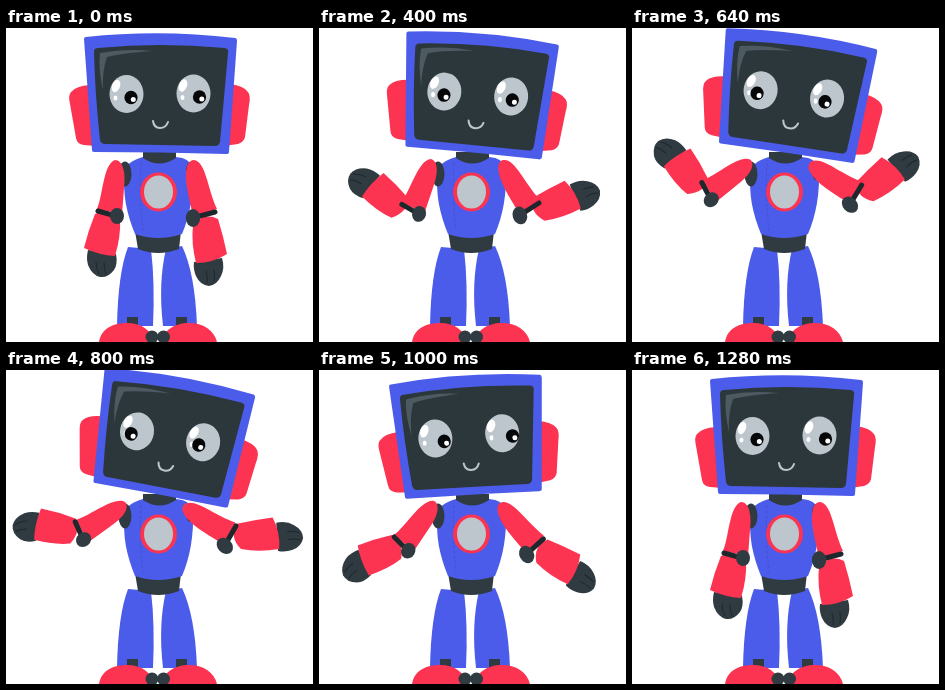
These frames come from a looping animation (307x314 px, 1400 ms). An HTML page with a canvas:

```html
<!DOCTYPE html>
<html lang="en">
<head>
<meta charset="utf-8">
<title>Waving robot</title>
<style>
  html, body { margin: 0; width: 100%; height: 100%; overflow: hidden; background: #fff; }
  canvas { display: block; width: 307px; height: 314px; }
</style>
</head>
<body>
<canvas id="stage"></canvas>
<script>
const W = 307, H = 314, LOOP = 1400, STEP = 40, LAST = 1280;
const BLUE = '#4c5cea', RED = '#fc3351', DARK = '#2f3b41', SCREEN = '#2c373b',
      GRAY = '#bcc6cc', SHINE = '#4d5a61', LINE = '#1d272c';

const canvas = document.getElementById('stage');
const ctx = canvas.getContext('2d');
const ratio = window.devicePixelRatio || 1;
canvas.width = Math.round(W * ratio);
canvas.height = Math.round(H * ratio);

// Poses in degrees over time; arm angles open outwards on both sides.
const TIMES = [0, 200, 400, 540, 640, 800, 1000, 1110, LAST];
const POSE = {
  head:       [0, 3, 4.6, 6.3, 7.6, 9.8, -4.1, -6.5, 0],
  leftUpper:  [0, -6.5, 14.2, 34, 46.6, 50, 29.5, 18, 0],
  leftFore:   [0, 43, 118, 139, 132, 88, 55, 33, 0],
  rightUpper: [0, -9, 18, 35, 44, 45.5, 27.5, 16.5, 0],
  rightFore:  [0, 32, 104, 126, 120, 85.5, 51, 31, 0]
};

// Cubic curve through the poses that rests at each turning point.
function poseAt(values, t) {
  const end = TIMES.length - 1;
  let i = 0;
  while (i < end - 1 && t >= TIMES[i + 1]) i++;
  const secant = k => (values[k + 1] - values[k]) / (TIMES[k + 1] - TIMES[k]);
  const slope = k => {
    if (k === 0) return secant(0);
    if (k === end) return secant(end - 1);
    if (secant(k - 1) * secant(k) <= 0) return 0;
    return (values[k + 1] - values[k - 1]) / (TIMES[k + 1] - TIMES[k - 1]);
  };
  const span = TIMES[i + 1] - TIMES[i], u = (t - TIMES[i]) / span, v = 1 - u;
  return v * v * (1 + 2 * u) * values[i] + u * u * (3 - 2 * u) * values[i + 1]
       + span * u * v * (v * slope(i) - u * slope(i + 1));
}

function shape(d, color) {
  ctx.fillStyle = color;
  ctx.fill(new Path2D(d));
}

function stroke(d, color, width) {
  ctx.strokeStyle = color;
  ctx.lineWidth = width;
  ctx.lineCap = 'round';
  ctx.stroke(new Path2D(d));
}

function oval(x, y, rx, ry, color, tilt = 0) {
  ctx.fillStyle = color;
  ctx.beginPath();
  ctx.ellipse(x, y, rx, ry, tilt, 0, Math.PI * 2);
  ctx.fill();
}

function turn(x, y, degrees) {
  ctx.translate(x, y);
  ctx.rotate(degrees * Math.PI / 180);
  ctx.translate(-x, -y);
}

function group(draw) {
  ctx.save();
  draw();
  ctx.restore();
}

function drawBody() {
  shape('M122 219 Q112 245 111 298 H147 Q149 255 145 221 Z', BLUE);
  shape('M160 221 Q152 255 157 298 H191 Q189 245 176 218 Z', BLUE);
  shape('M121 289 H132 V298 H121 Z M170 289 H181 V298 H170 Z', DARK);
  shape('M93 314 C95 300 108 295 121 295 C136 295 146 303 148 314 Z', RED);
  shape('M155 314 C157 303 168 295 183 295 C197 295 208 302 211 314 Z', RED);
  oval(146, 309, 6.5, 6.5, DARK);
  oval(157.5, 309, 6.5, 6.5, DARK);

  shape('M129 203 H175 L173 221 Q152 229 132 221 Z', DARK);
  shape('M119 143 Q120 134 137 129 H170 Q184 130 187 140 C188 165 184 188 176 206 ' +
        'Q152 214 129 206 C121 186 116 166 119 143 Z', BLUE);
  shape('M137 124 H170 V130 Q153 141 137 130 Z', DARK);
  ctx.setLineDash([2, 3]);
  stroke('M135 136 Q133 168 137 202', '#4350cf', 1);
  ctx.setLineDash([]);
  oval(119, 146, 6.5, 12.5, DARK);
  oval(184, 143, 4, 9, DARK);
  oval(152.5, 164, 18.5, 19.5, RED);
  oval(152.5, 164, 14.5, 16.5, GRAY);
}

function drawLeftArm(upper, fore) {
  group(() => {
    turn(114, 143, upper);
    group(() => {
      turn(97, 184, fore - upper);
      shape('M82 222 L110 226 Q112 236 108 242 Q102 250 94 249 Q86 247 82 237 Q80 230 82 222 Z', DARK);
      stroke('M90 234 Q90 241 93 246 M98 235 Q98 242 100 246', LINE, 1);
      shape('M89 186 Q101 180 114 192 Q115 208 109 228 Q93 227 78 220 Q82 203 89 186 Z', RED);
    });
    shape('M109 132 C117 132 120 145 118 160 Q117 174 116 186 L91 181 ' +
          'C97 168 97 136 109 132 Z', RED);
    stroke('M92 183 L110 188', LINE, 5);
    oval(111, 188, 7, 8, DARK);
  });
}

function drawRightArm(upper, fore) {
  group(() => {
    turn(186, 145, -upper);
    group(() => {
      turn(201, 188, upper - fore);
      shape('M188 234 L216 230 Q219 240 215 248 Q211 257 203 258 Q194 257 190 248 Q187 241 188 234 Z', DARK);
      stroke('M200 243 Q202 250 201 255 M208 242 Q209 249 208 253', LINE, 1);
      shape('M187 197 Q198 184 212 191 Q217 207 221 226 Q207 235 190 235 Q185 215 187 197 Z', RED);
    });
    shape('M187 132 C200 132 201 160 211 181 L187 189 C184 172 179 158 180 144 Q181 133 187 132 Z', RED);
    stroke('M190 189 L209 184', LINE, 5);
    oval(187, 190, 7.2, 9, DARK);
  });
}

function drawEye(x, y, gaze) {
  oval(x, y, 17, 19, GRAY);
  oval(x - 10.5, y - 8, 4, 6.5, '#fff', 0.35);
  oval(x - 11, y + 4, 2, 2.6, '#fff');
  oval(x + gaze, y + 3.5, 6.6, 6.8, '#050708');
  oval(x + gaze + 2.3, y + 5.5, 2.5, 2.5, '#fff');
}

function drawHead(angle) {
  group(() => {
    turn(153, 125, angle);
    shape('M84 57 Q70 58 65 64 Q62 67 64 76 L70 110 Q71 116 78 117 L90 118 Z', RED);
    shape('M224 56 Q238 58 242 64 Q245 68 243 77 L239 109 Q238 114 232 116 L218 118 Z', RED);
    shape('M78 11 Q78 9 80 9 Q154 1 229 10 Q231 10 231 13 L223 124 Q223 126 220 126 ' +
          'Q154 124 88 124 Q86 124 86 122 Z', BLUE);
    shape('M88 24 Q88 20 92 20 Q154 14 219 20 Q223 21 222 25 L214 114 Q213 118 209 118 ' +
          'Q154 117 99 116 Q95 116 94 112 Q89 66 88 24 Z', SCREEN);
    shape('M94 25 Q120 20 147 23 Q116 25 101 29 Q96 43 97 62 Q92 41 94 25 Z', SHINE);
    const gaze = 5 - angle;
    drawEye(120.5, 66, gaze - 0.5);
    drawEye(187.5, 65.5, gaze + 1);
    stroke('M147 93 Q148 100 154 100 Q160 100 162 94', GRAY, 2);
  });
}

function render(now) {
  const t = Math.min(LAST, Math.floor((now % LOOP) / STEP) * STEP);
  const pose = name => poseAt(POSE[name], t);
  ctx.setTransform(ratio, 0, 0, ratio, 0, 0);
  ctx.fillStyle = '#fff';
  ctx.fillRect(0, 0, W, H);
  drawBody();
  drawLeftArm(pose('leftUpper'), pose('leftFore'));
  drawRightArm(pose('rightUpper'), pose('rightFore'));
  drawHead(pose('head'));
}

let start;
function tick(now) {
  if (start === undefined) start = now;
  render(now - start);
  requestAnimationFrame(tick);
}
render(0);
requestAnimationFrame(tick);
</script>
</body>
</html>
```
